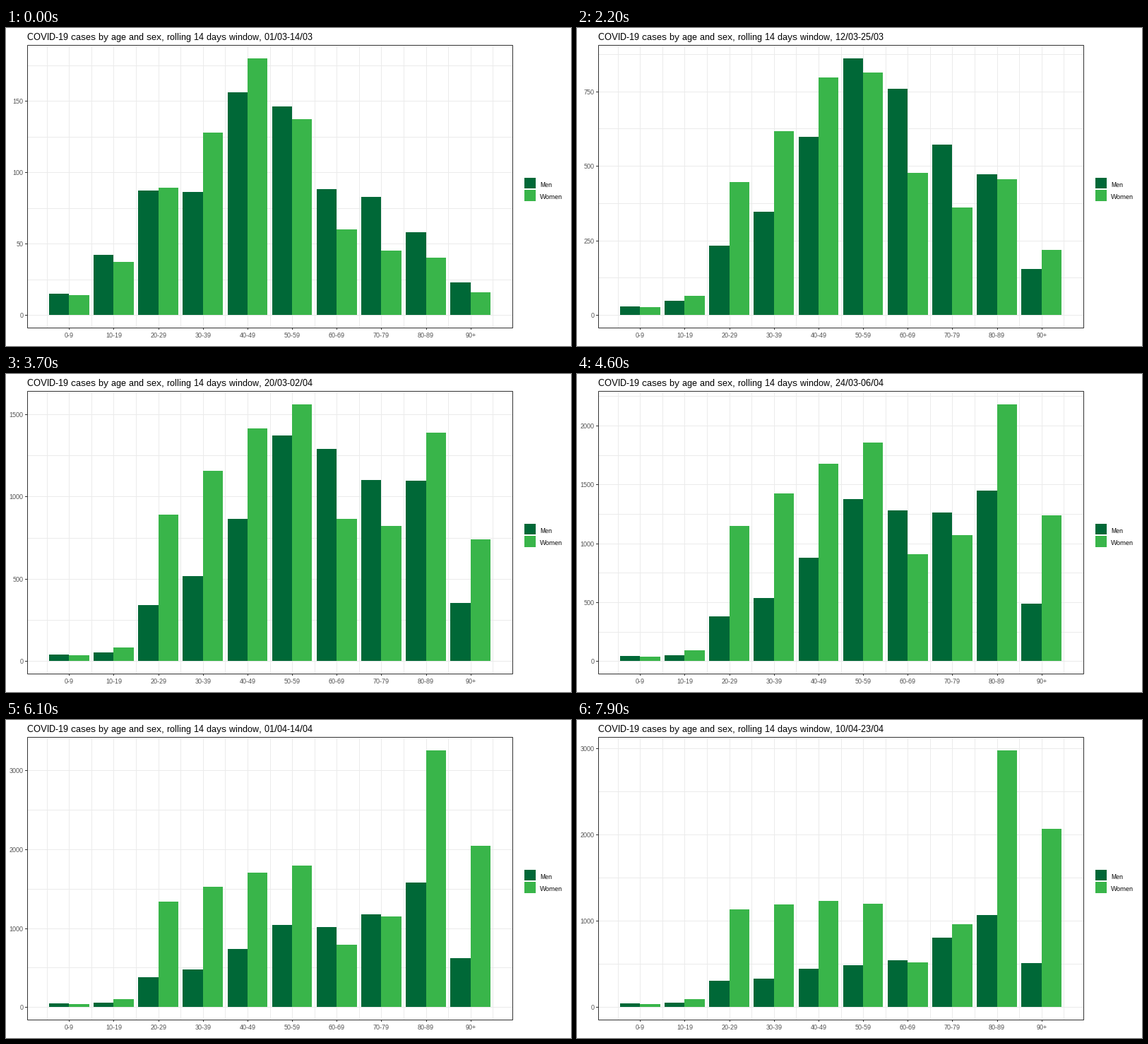
These frames come from a looping animation (800 by 450 pixels, 8000 ms). A matplotlib script:

```python
import math
import matplotlib.pyplot as plt
import numpy as np
from matplotlib.animation import FuncAnimation
from matplotlib.collections import LineCollection
from matplotlib.patches import Rectangle

plt.rcParams.update({
    "font.family": "Liberation Sans",
    "text.hinting": "native",
    "text.hinting_factor": 1,
})

FRAMES, INTERVAL = 80, 100
PX = 0.72  # points per pixel at 100 dpi
LEFT, RIGHT, TOP, BOTTOM = 30.5, 717.5, 24.5, 424.5
UNIT = (BOTTOM - TOP) / 1.1  # height of the tallest bar
ZERO = BOTTOM - 0.05 * UNIT - 0.1
FIRST, STEP = 89.325, 63.15
BAR = 0.45 * STEP
MEN, WOMEN = "#006837", "#39B54A"
GRID, INK, GREY = "#EBEBEB", "#333333", "#4D4D4D"
AGES = np.arange(10)  # decades: 0-9, 10-19, ... 90+


class Wave:
    """Bell-shaped outbreak in every age group, from its first count to its peak."""

    def __init__(self, first, peak, peak_time, fall):
        self.peak = np.array(peak)
        self.time = np.interp(AGES, (1, 3, 5, 6, 8, 9), peak_time)
        self.rise = self.time / np.sqrt(np.log(self.peak / np.array(first)))
        self.fall = np.interp(AGES, (3, 5, 7, 8), fall)

    def at(self, t):
        away = t - self.time
        width = np.where(away < 0, self.rise, self.fall)
        return self.peak * np.exp(-(away / width) ** 2)


men = Wave(first=(15, 42, 87, 86, 156, 146, 88, 83, 58, 23),
           peak=(49, 53, 388, 535, 885, 1400, 1310, 1270, 1610, 622),
           peak_time=(63, 43, 41, 40, 56, 63), fall=(52, 37, 46, 36))
women = Wave(first=(14, 37, 89, 128, 180, 137, 60, 45, 40, 16),
             peak=(42, 97, 1340, 1540, 1755, 1905, 910, 1165, 3375, 2215),
             peak_time=(65, 56, 51, 43, 67, 70), fall=(45, 41, 55, 34))


def nice_breaks(lo, hi, want=5):
    """Wilkinson's extended axis labelling, for steps through zero."""
    span = hi - lo
    best, result = -math.inf, None
    power = math.floor(math.log10(span))
    for rank, q in enumerate((1, 5, 2, 2.5, 4, 3)):
        for z in (power - 2, power - 1, power):
            step = q * 10.0 ** z
            for n in range(2, 10):
                top = (n - 1) * step
                simple = 1 - rank / 5
                cover = 1 - 0.5 * ((hi - top) ** 2 + lo ** 2) / (0.1 * span) ** 2
                density = (n - 1) / top
                ideal = (want - 1) / (max(top, hi) - lo)
                dense = 2 - max(density / ideal, ideal / density)
                score = 0.25 * simple + 0.2 * cover + 0.5 * dense
                if score > best:
                    best, result = score, (n, step)
    n, step = result
    return step * np.arange(n), step


def date(day):
    """Day and month, counted from the first of March."""
    month = 3
    for length in (31, 30):
        if day < length:
            break
        day -= length
        month += 1
    return f"{day + 1:02d}/{month:02d}"


def crisp(v):
    """Centre of the nearest pixel."""
    return math.floor(v + 0.5) + 0.5


def lines(color, z, segments=()):
    group = LineCollection(list(segments), colors=color, linewidths=PX, zorder=z,
                           capstyle="butt", snap=False)
    ax.add_collection(group, autolim=False)
    return group


def label(x, y, text, size=9, color="black", ha="left"):
    return ax.text(x, y, text, fontsize=size * PX, color=color, ha=ha,
                   va="baseline", zorder=5)


def box(x, y, w, h, color):
    return ax.add_patch(Rectangle((x, y), w, h, fc=color, lw=0, zorder=2))


fig = plt.figure(figsize=(8, 4.5), dpi=100, facecolor="white")
ax = fig.add_axes([0, 0, 1, 1])
ax.set(xlim=(0, 800), ylim=(450, 0))
ax.axis("off")

centres = FIRST + STEP * AGES
verticals = [crisp(FIRST + STEP * (k - 1) / 2) for k in range(21)]
lines(GRID, 1, [[(x, TOP), (x, BOTTOM)] for x in verticals])
lines(INK, 4, [[(crisp(x), BOTTOM), (crisp(x), 427)] for x in centres])
ax.add_patch(Rectangle((LEFT, TOP), RIGHT - LEFT, BOTTOM - TOP, fill=False,
                       ec=INK, lw=PX, zorder=4, snap=False))
for x, a in zip(centres, AGES):
    label(x, 438, f"{a}0-{a}9" if 0 < a < 9 else "90+" if a else "0-9",
          color=GREY, ha="center")

box(734, 212, 16, 15, MEN)
box(734, 229, 16, 16, WOMEN)
label(756, 225, "Men")
label(756, 242, "Women")

grid = lines(GRID, 1)
ticks = lines(INK, 4)
title = label(30, 17, "", size=13)
y_labels = [label(24.5, 0, "", color=GREY, ha="right") for _ in range(10)]
bars = [box(x - BAR, ZERO, BAR, 0, MEN) for x in centres]
bars += [box(x, ZERO, BAR, 0, WOMEN) for x in centres]


def draw(frame):
    cases = np.concatenate([men.at(frame), women.at(frame)])
    scale = UNIT / cases.max()
    lo, hi = -0.05 * cases.max(), 1.05 * cases.max()

    for bar, n in zip(bars, cases):
        bar.set_y(ZERO - n * scale)
        bar.set_height(n * scale)

    breaks, step = nice_breaks(lo, hi)
    halves = np.arange(0, breaks[-1] + step, step / 2)
    rows = [crisp(ZERO - v * scale) for v in halves if v <= hi]
    grid.set_segments([[(LEFT, y), (RIGHT, y)] for y in rows])

    shown = [v for v in breaks if v <= hi]
    marks = [crisp(ZERO - v * scale) for v in shown]
    ticks.set_segments([[(27, y), (LEFT, y)] for y in marks])
    for text in y_labels:
        text.set_text("")
    for text, v, y in zip(y_labels, shown, marks):
        text.set_text(f"{v:.0f}")
        text.set_y(y + 3.5)

    day = (frame + 1) // 2
    title.set_text("COVID-19 cases by age and sex, rolling 14 days window, "
                   f"{date(day)}-{date(day + 13)}")
    return [grid, ticks, title, *y_labels, *bars]


anim = FuncAnimation(fig, draw, frames=FRAMES, interval=INTERVAL,
                     repeat=True, repeat_delay=0, blit=False)
plt.show()
```
